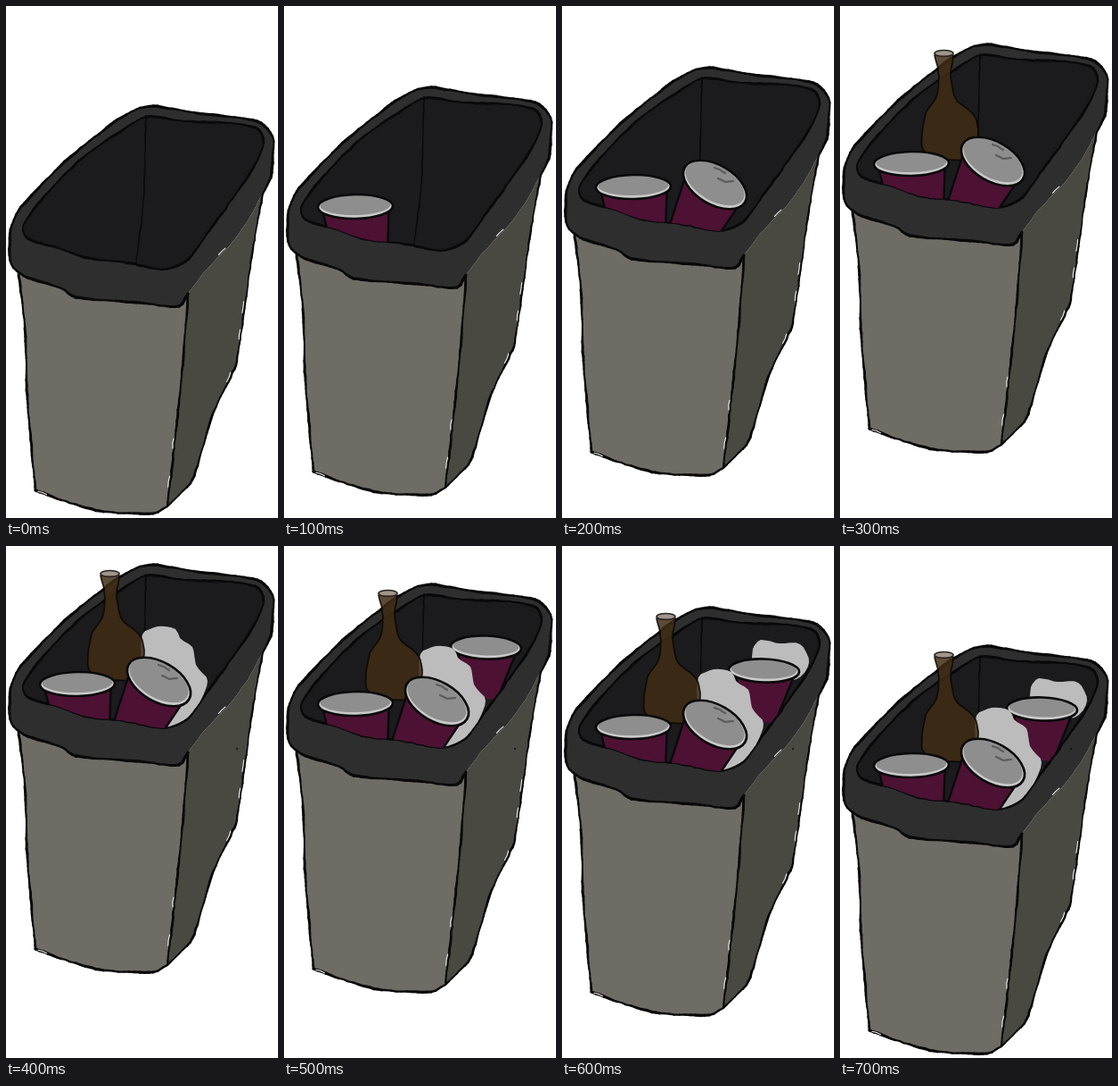
These frames come from a looping animation (305x573 px, 900 ms). An HTML page with a canvas:

```html
<!DOCTYPE html>
<html lang="en">
<head>
<meta charset="utf-8">
<title>Filling bin</title>
<style>
html, body { margin: 0; width: 100%; height: 100%; overflow: hidden; background: #fff; }
canvas { display: block; width: 305px; height: 573px; }
</style>
</head>
<body>
<canvas id="stage" width="305" height="573"></canvas>
<script>
const ctx = document.getElementById('stage').getContext('2d');
const STEP = 100, LOOP = 900;
const LIFT = [0, 21, 43, 69, 91, 69, 43, 0];
const INK = '#09090a';

let seed = 7;
const random = () => (seed = seed * 16807 % 2147483647) / 2147483647;
const wobble = () => (random() - 0.5) * 0.9;

// Hand-drawn smooth line through a few key points, as a list of samples.
function sketch(text, closed = false) {
  const p = text.split(' ').map(s => s.split(',').map(Number));
  const n = p.length, out = [];
  const at = i => closed ? p[(i + n) % n] : p[Math.max(0, Math.min(n - 1, i))];
  const handle = (a, b, len) => {
    const dx = b[0] - a[0], dy = b[1] - a[1], d = Math.hypot(dx, dy) || 1;
    return [dx / d * len, dy / d * len];
  };
  for (let i = 0; i < (closed ? n : n - 1); i++) {
    const [a, b, c, d] = [at(i - 1), at(i), at(i + 1), at(i + 2)];
    const len = Math.hypot(c[0] - b[0], c[1] - b[1]);
    const u = handle(a, c, len * 0.26), v = handle(b, d, len * 0.26);
    const count = Math.ceil(len / 6);
    for (let k = 0; k < count; k++) {
      const t = k / count, s = 1 - t;
      out.push([0, 1].map(j => wobble() * (k > 0) + s * s * s * b[j] +
        3 * s * s * t * (b[j] + u[j]) + 3 * s * t * t * (c[j] - v[j]) + t * t * t * c[j]));
    }
  }
  out.push(closed ? out[0] : p[n - 1]);
  return out;
}

function trace(points) {
  const path = new Path2D();
  points.forEach(p => path.lineTo(...p));
  return path;
}

function oval(x, y, rx, ry, turn = 0) {
  const path = new Path2D();
  path.ellipse(x, y, rx, ry, turn, 0, Math.PI * 2);
  return path;
}

function fill(path, color) {
  ctx.fillStyle = color;
  ctx.fill(path);
}

function line(path, width, color = INK) {
  ctx.strokeStyle = color;
  ctx.lineWidth = width;
  ctx.stroke(path);
}

// Brush line with uneven pressure.
function brush(points, width) {
  for (let i = 1; i < points.length; i++) {
    line(trace([points[i - 1], points[i]]), width * (0.95 + 0.2 * Math.sin(i * 0.6)));
  }
}

function inside(path, draw) {
  ctx.save();
  ctx.clip(path);
  draw();
  ctx.restore();
}

const rimEdge = sketch('204,322 194,336 150,332 78,326 62,316 20,302 6,289 5,250 14,229 62,178 ' +
  '121,130 150,114 165,112 215,120 262,125 286,131 299,146 299,170 297,192 288,210');
const lip = sketch('288,210 276,232 258,259 240,279 222,298 204,322');
const mouthEdge = sketch('157,124 200,129 262,132 284,139 289,153 276,183 222,260 201,286 176,295 ' +
  '140,288 92,282 62,272 24,260 19,247 42,214 86,170 132,138', true);
const leftEdge = sketch('14,298 21,360 24,440 33,542');
const baseEdge = sketch('33,542 62,553 105,565 165,568 181,560');
const cornerEdge = sketch('204,322 199,392 190,480 181,560');
const sideEdge = sketch('288,210 277,272 262,378 258,402');
const sideBase = sketch('258,402 230,462 209,530 181,560');
const seam = sketch('157,123 154,220 146,286');

const rim = trace([...rimEdge, ...lip]);
const mouth = trace(mouthEdge);
const front = trace([...leftEdge, ...baseEdge, ...[...cornerEdge].reverse()]);
const side = trace([...lip, ...cornerEdge, ...[...sideBase].reverse(), ...[...sideEdge].reverse()]);

// Slivers of white left beside the ink.
const slivers = [leftEdge, baseEdge, cornerEdge, cornerEdge, sideEdge, sideEdge, sideBase, lip]
  .map(edge => {
    const i = Math.floor(random() * (edge.length - 3));
    return trace(edge.slice(i, i + 3).map(([x, y]) => [x - 1.6, y - 0.6]));
  });

function bin() {
  fill(side, '#494841');
  fill(front, '#6f6c65');
  fill(rim, '#2e2e2f');
  fill(mouth, '#1b1b1e');
  brush(seam, 1.5);
  brush(sideEdge, 2);
  brush(sideBase, 2.4);
  brush(leftEdge, 2.6);
  brush(cornerEdge, 2.5);
  brush(baseEdge, 2.8);
  brush(rimEdge, 2.9);
  brush(mouthEdge, 2.6);
  slivers.forEach(s => line(s, 1.1, '#eee'));
}

// Angles in degrees: turn of the lid, lean of the body, taper of its sides.
function cup(x, y, rx, ry, turn, lean, taper) {
  const rad = Math.PI / 180, depth = 62;
  const wall = dir => {
    const w = dir * rx * 0.9, a = (-dir * taper - lean) * rad;
    const top = [x + w * Math.cos(turn * rad), y + w * Math.sin(turn * rad)];
    return [top, [top[0] + depth * Math.sin(a), top[1] + depth * Math.cos(a)]];
  };
  const left = wall(-1), right = wall(1);
  const edge = oval(x, y, rx, ry, turn * rad);
  const lid = oval(x, y - 1.5, rx - 2.5, ry - 2.5, turn * rad);
  return () => {
    inside(mouth, () => {
      fill(trace([...left, ...right.reverse()]), '#4d1133');
      right.reverse();
      [left, right].forEach(w => line(trace(w), 2.4));
    });
    fill(edge, '#c9c9c9');
    fill(lid, '#8e8e8e');
    line(edge, 2.7);
  };
}

function paper(text) {
  const shape = trace(sketch(text, true));
  return () => {
    inside(mouth, () => fill(shape, '#bcbcbc'));
    brush(mouthEdge, 1.6);
  };
}

const glass = sketch('106,124 111,148 108,171 96,189 95,232 140,240 155,212 150,191 130,173 124,148 127,124');
const glassShape = trace(glass);
const glassTop = oval(116.5, 122, 10.5, 3.5);

function bottle() {
  fill(glassShape, 'rgba(64,44,20,.85)');
  line(glassShape, 1.7, 'rgba(8,6,4,.85)');
  fill(glassTop, 'rgba(125,115,102,.75)');
  line(glassTop, 1.6, '#2a2420');
}

const tilted = cup(171.5, 243, 39, 22, 30, 26, 8);
const dents = ['171,224 177,226 183,230', '175,236 183,240 192,239'].map(d => trace(sketch(d)));
function tiltedCup() {
  tilted();
  dents.forEach(d => line(d, 2.2, '#5c5c5c'));
}

// Drawn back to front; "from" is the step when the item drops in.
const items = [
  { from: 6, draw: paper('214,158 223,148 244,152 267,153 277,173 263,192 218,188') },
  { from: 5, draw: cup(226.5, 182.5, 39.5, 13, 2, 0, 22) },
  { from: 4, draw: paper('153,190 170,181 190,184 195,194 209,204 213,224 226,242 206,284 180,300 153,225') },
  { from: 3, draw: bottle },
  { from: 1, draw: cup(80, 245.5, 42, 13.5, -1, -6, 8) },
  { from: 2, draw: tiltedCup }
];
const speck = oval(259, 227, 1, 1);

function frame() {
  const step = Math.min(LIFT.length - 1, Math.floor(performance.now() % LOOP / STEP));
  ctx.fillStyle = '#fff';
  ctx.fillRect(0, 0, 305, 573);
  ctx.save();
  ctx.lineCap = ctx.lineJoin = 'round';
  ctx.translate(0, -LIFT[step]);
  bin();
  items.forEach(item => step >= item.from && item.draw());
  ctx.restore();
  if (step >= 4) fill(speck, INK);
  requestAnimationFrame(frame);
}
frame();
</script>
</body>
</html>
```
